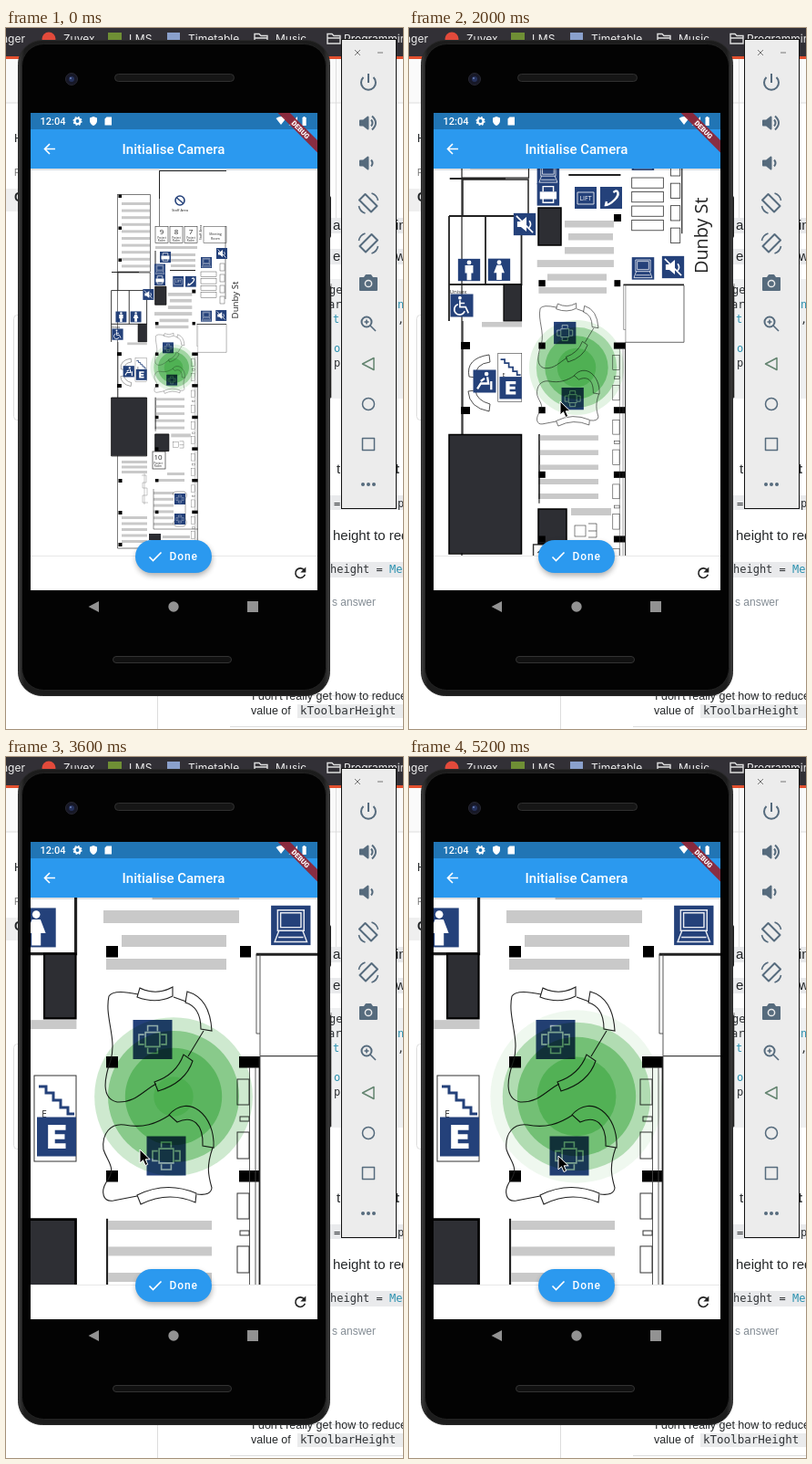
Write an HTML page that moves like this. It is 436 px wide and 768 px high and loops after 5.3 s.

```html
<!DOCTYPE html>
<html lang="en">
<head>
<meta charset="utf-8">
<title>Initialise Camera</title>
<style>
  html, body { margin: 0; width: 100%; height: 100%; overflow: hidden; background: #fff; }
  svg { display: block; }
  text { white-space: pre; }
  .ui { font-family: Inter, sans-serif; }
  .app { font-family: Roboto, sans-serif; font-weight: 500; fill: #fff; }
  .web { font-family: "Liberation Sans", Arial, sans-serif; fill: #242729; }
  .code { font-family: "DejaVu Sans Mono", monospace; font-size: 12px; fill: #303336; }
  .plan { font-family: "Open Sans", sans-serif; fill: #222; }
  .line { fill: none; stroke: #222; stroke-width: 1; }
  .tool { fill: none; stroke: #566b7d; stroke-width: 2; stroke-linejoin: round; }
  #pulse { mix-blend-mode: multiply; }
</style>
</head>
<body>
<svg width="436" height="768" viewBox="0 0 436 768">
  <defs>
    <clipPath id="view"><rect x="27" y="154" width="315" height="424.500"/></clipPath>
    <clipPath id="screen"><rect x="27" y="93" width="315" height="523"/></clipPath>
    <filter id="soft" x="-30%" y="-50%" width="160%" height="220%"><feGaussianBlur stdDeviation="3"/></filter>
    <linearGradient id="rim" x2="1" y2="0">
      <stop offset="0" stop-color="#3c3c3c"/><stop offset=".02" stop-color="#1c1c1c"/>
      <stop offset=".98" stop-color="#1c1c1c"/><stop offset="1" stop-color="#3c3c3c"/>
    </linearGradient>
  </defs>

  <!-- browser page -->
  <rect width="436" height="768" fill="#fff"/>
  <rect y="34" width="436" height="48" fill="#fafafa"/>
  <rect width="436" height="31" fill="#323036"/>
  <rect y="31" width="436" height="3" fill="#e2502f"/>
  <g class="ui" font-size="12" fill="#eee">
    <text x="-5" y="16">nger</text><text x="63" y="16">Zuvex</text>
    <text x="135" y="16">LMS</text><text x="200" y="16">Timetable</text>
    <text x="296" y="16">Music</text><text x="371" y="16">Programming</text>
  </g>
  <circle cx="47" cy="12" r="7.500" fill="#e24a3b"/>
  <rect x="112" y="5" width="15" height="14" fill="#6f8f35"/>
  <rect x="177" y="5" width="14" height="14" fill="#8aa0cc"/>
  <g fill="none" stroke="#ddd" stroke-width="1.400">
    <path id="folder" d="M273 17V6.500h5l2 2h7V17zM273 11h14"/>
    <use href="#folder" x="80"/>
  </g>
  <path d="M0 82h14M355 82h81M362.500 34v178M166.500 728v40M246 731.500h190M246 765.500h190" stroke="#dcdcdc"/>
  <rect x="8.500" y="314.500" width="30" height="115" rx="4" fill="#fff" stroke="#ddd"/>
  <rect y="176" width="14" height="25" fill="#efefef"/>
  <g class="web">
    <text x="9" y="125" font-size="13">Home</text>
    <text x="9" y="162" font-size="10" fill="#777">PUB</text>
    <text x="9" y="190" font-size="14" font-weight="700">C</text>
  </g>
  <g fill="#e9eaec">
    <rect x="355" y="208" width="81" height="17"/><rect x="355" y="242" width="81" height="17"/>
    <rect x="355" y="275" width="81" height="131" fill="#eff0f1"/>
    <rect x="355" y="512" width="81" height="16"/><rect x="355" y="585" width="81" height="17"/>
  </g>
  <rect x="354" y="280" width="4" height="125" fill="#b5b5b5"/>
  <g class="web" font-size="15">
    <text x="359" y="221">a</text><text x="428" y="221">in</text>
    <text x="359" y="255">e</text><text x="428" y="255">w</text>
    <text x="363" y="488">t</text><text x="427" y="488" font-weight="700">t</text>
    <text x="359" y="561">height to reduce</text>
    <text x="358" y="633" font-size="12" fill="#848d95">s answer</text>
    <text x="270" y="736" font-size="12.500">I don't really get how to reduce</text>
    <text x="269" y="752" font-size="12.500">value of</text>
  </g>
  <rect x="320" y="741" width="116" height="15" fill="#eaebec"/>
  <g class="code">
    <text x="355" y="291">ge</text><text x="354" y="307">ar</text><text x="430" y="307" fill="#2b91af">n</text>
    <text x="359" y="323" fill="#2b91af">t</text><text x="430" y="323">,</text>
    <text x="360" y="355" fill="#2b91af">o</text><text x="360" y="371">p</text>
    <text x="360" y="525">=</text><text x="430" y="525">p</text>
    <text x="356" y="597">height = <tspan fill="#2b91af">Me</tspan></text>
    <text x="323" y="752" font-size="12.500">kToolbarHeight</text>
  </g>

  <!-- phone -->
  <rect x="351" y="184" width="6" height="46" rx="2" fill="#222"/>
  <rect x="351" y="282" width="6" height="124" rx="2" fill="#222"/>
  <rect x="13.500" y="13.500" width="342" height="718" rx="26" fill="url(#rim)" stroke="#2a2a2a"/>
  <rect x="17.500" y="17.500" width="334" height="708" rx="24" fill="#030303" stroke="#242424"/>
  <rect x="119.500" y="50.500" width="131" height="8" rx="4" fill="#161616" stroke="#303030"/>
  <rect x="117.500" y="688.500" width="130" height="7" rx="3.500" fill="#111" stroke="#333"/>
  <circle cx="72" cy="56" r="6.500" fill="#171827" stroke="#272731"/>
  <circle cx="72" cy="56" r="3" fill="#26325c"/><circle cx="71" cy="55" r="1" fill="#6d80b8"/>
  <g fill="#929292">
    <path d="M102 628v12l-11.500-6z"/><circle cx="184" cy="634" r="5.700"/><rect x="265" y="628" width="12" height="12"/>
  </g>

  <!-- app -->
  <rect x="27" y="93" width="315" height="523" fill="#fff"/>
  <g clip-path="url(#view)">
    <g id="map"></g>
    <g id="pulse" fill="#4caf50"></g>
  </g>
  <path d="M27 578.500h315" stroke="#e8e8e8"/>
  <g clip-path="url(#screen)">
    <rect x="27" y="152" width="315" height="4" fill="#000" opacity=".12"/>
    <rect x="27" y="111" width="315" height="43" fill="#2b99ef"/>
    <rect x="27" y="93" width="315" height="18" fill="#2175b5"/>
    <text class="app" x="37.500" y="106" font-size="11">12:04</text>
    <g fill="#fff">
      <circle cx="78.500" cy="102" r="3" fill="none" stroke="#fff" stroke-width="2.200"/>
      <circle cx="78.500" cy="102" r="4.400" fill="none" stroke="#fff" stroke-width="1.300" stroke-dasharray="1.800 1.650"/>
      <path d="M96 97l4 1.600v3.400q-.5 3.700-4 5q-3.500-1.300-4-5v-3.400zM110.500 97.500h5.500v9h-7.500v-7zM296.500 99q5.500-4 11 0l-5.500 7zM320 97v9.500h-9.500zM325.500 98h1v-1h2v1h1.200v9h-4.200z"/>
    </g>
    <g transform="translate(342 93) rotate(45)">
      <rect x="-45" y="21.300" width="90" height="9.400" fill="#922434" opacity=".92"/>
      <text class="app" y="28.800" font-size="7.600" text-anchor="middle" style="font-weight:900">DEBUG</text>
    </g>
    <path d="M54 132.500H43M48 127l-5.500 5.500l5.500 5.500" fill="none" stroke="#fff" stroke-width="1.600"/>
    <text class="app" x="184" y="138" font-size="15" text-anchor="middle">Initialise Camera</text>
    <rect x="143" y="564" width="83" height="36" rx="18" opacity=".32" filter="url(#soft)"/>
    <rect x="142" y="561" width="84" height="36" rx="18" fill="#2b99ef"/>
    <path d="M157.500 579.500l4 4l9-9" fill="none" stroke="#fff" stroke-width="1.600"/>
    <text class="app" x="179.500" y="583.300" font-size="12" letter-spacing=".9">Done</text>
    <path d="M327.500 594a5.300 5.300 0 1 0 .8 4.700" fill="none" stroke="#222" stroke-width="1.600"/>
    <path d="M329.300 590.500v6h-6z" fill="#222"/>
  </g>

  <!-- emulator tools -->
  <rect x="368.500" y="12.500" width="60" height="514" fill="#ececec" stroke="#111"/>
  <path d="M383 24l6 6m0-6l-6 6M408 27h6" stroke="#777" fill="none"/>
  <g class="tool">
    <path d="M398 50v10M392.500 54a8 8 0 1 0 11 0"/>
    <g id="speaker"><path d="M389 101.500h3.500l5-4v13l-5-4H389z" fill="#566b7d"/><path d="M401 100.500q3 3.500 0 7"/></g>
    <path d="M402 96.500q8 7.500 0 15"/>
    <use href="#speaker" y="44"/>
    <g id="turn"><path d="M394.500 182l13 13l-6.500 6.500l-13-13z"/><path d="M387.500 195q1 6 7 8M408.500 189q-1-6-7-8" stroke-width="1.600"/></g>
    <use href="#turn" transform="translate(796 44) scale(-1 1)"/>
    <path d="M389 274h4.500l2-3h5l2 3h4.500v13h-18z" fill="#566b7d"/>
    <circle cx="398" cy="280" r="3.600" stroke="#ececec" stroke-width="1.500"/>
    <circle cx="396" cy="322" r="5.500"/><path d="M400 326l6 6M393.500 322h5M396 319.500v5" stroke-width="1.600"/>
    <path d="M404 361.500v13l-12.500-6.500z" stroke="#63846f" stroke-width="1.500"/>
    <circle cx="398" cy="412" r="6.500" stroke-width="1.500"/>
    <rect x="391.500" y="449.500" width="13" height="13" stroke-width="1.500"/>
  </g>
  <g fill="#566b7d"><circle cx="392" cy="500" r="2"/><circle cx="398" cy="500" r="2"/><circle cx="404" cy="500" r="2"/></g>

  <path id="cursor" d="M0 0v15l3.500-3.300l2.500 5.800l2.700-1.200l-2.500-5.500h5z" fill="#000" stroke="#fff" stroke-width="1"/>
</svg>

<script>
const CX = 184.5, CY = 366, LOOP = 5300, STEP = 100;
const NEAR = 3.61, MID = 2.04;
const $ = id => document.getElementById(id);

// Drawing helpers returning SVG markup
const box = (x, y, w, h, fill = '#000') => `<rect x="${x}" y="${y}" width="${w}" height="${h}" fill="${fill}"/>`;
const frame = (x, y, w, h, sw = 1, fill = 'none') =>
  `<rect x="${x}" y="${y}" width="${w}" height="${h}" fill="${fill}" stroke="#333" stroke-width="${sw}"/>`;
const path = (d, sw = 1, stroke = '#222') => `<path class="line" d="${d}" style="stroke:${stroke};stroke-width:${sw}"/>`;
const label = (x, y, size, str, more = '') =>
  `<text class="plan" x="${x}" y="${y}" font-size="${size}" text-anchor="middle" ${more}>${str}</text>`;
const repeat = (n, fn) => Array.from({ length: n }, (_, i) => fn(i)).join('');
const bars = (x, y, w, h, n, gap) => repeat(n, i => box(x, y + i * gap, w, h, '#c9c9c9'));
const zone = (k, body) => `<g transform="${zoomAt(1 / k)}">${body}</g>`;
const zoomAt = s => `translate(${CX} ${CY}) scale(${s}) translate(${-CX} ${-CY})`;

const ink = (d, sw = .7) => `<path d="${d}" fill="none" stroke="#fff" stroke-width="${sw}"/>`;
const solid = d => `<path d="${d}" fill="#fff"/>`;
const body = skirt => `<circle cy="-4" r="1.200" fill="#fff"/>` +
  solid(skirt ? 'M-1.300-2.500h2.600l1.600 4.200h-1.500v3.800h-2.800V1.700h-1.500z' : 'M-2.200-2.500h4.400v4.200h-1v3.800h-2.400V1.700h-1z');
const glyphs = {
  table: `<g opacity=".65">${ink('M-2.200-2.200h4.400v4.400h-4.400zM-1.500-2.600v-1.600h3v1.600M-1.500 2.600v1.600h3V2.600M-2.600-1.500h-1.600v3h1.600M2.600-1.500h1.600v3H2.600', .45)}</g>`,
  pc: `<g opacity=".9">${ink('M-4-4.600h8v6.200h-8zM-3.100-3.800h6.200V.6h-6.200zM-3.600 1.600l-1.300 3.400h9.800l-1.300-3.400M-3.800 3.600h7.600', .4)}</g>`,
  mute: solid('M-4-1.500h2l3-2.500v8l-3-2.500h-2z') + ink('M-4.500-4.500l9 9M2.500-1.800q1.500 2 0 3.600', .8),
  man: body(false), woman: body(true),
  wheel: `<circle cx="-1" cy="-4" r=".9" fill="#fff"/>` + ink('M-1-2.800V.8h3l1.500 3.200M-2-.6a2.800 2.800 0 1 0 3.500 3.600M-1-1.200h2.500', .8),
  sit: `<circle cx="1" cy="-3.800" r="1.100" fill="#fff"/>` + ink('M1.500-2.200L2 1.200h-4L-3.800 4M0-1.500l-2 1.500M3.500 0v4.500', 1.100),
  lift: ink('M-4.500-3h9v6.500h-9z', .4) + `<text y="1.500" font-size="3.500" class="plan" style="fill:#fff" text-anchor="middle">LIFT</text>`,
  phone: ink('M3-4q2 2-1 5t-5 3l.5-2M3-4l-1.800 1', 1.200),
  print: solid('M-4.500-1.500h9v4h-9z') + ink('M-2.800-1.500v-2.800h5.600v2.800M-2.800 1.500v2.800h5.600V1.500'),
  exit: `<path d="M-2.600-3.600h5.400v1.600h-3.300v1.200h3v1.600h-3V2h3.300v1.600h-5.400z" fill="#fff"/>`
};
const icon = (x, y, name, size = 12) =>
  `<g transform="translate(${x} ${y}) scale(${size / 12})">${box(-6, -6, 12, 12, '#24417a')}${glyphs[name]}</g>`;

// Whole floor, at the widest zoom
const outer = [
  path('M242 156.500H168.500V217M122.500 182.500H158.500V267H122.500M122.500 182V570H211M241 217V297', .6),
  path('M168.500 156.500H242M168.500 156.500V187M116 267.500H146', 1),
  bars(127, 191, 31, 3, 10, 7.6),
  repeat(3, i => box(123.500, 182.500 + 35 * i, 3.500, 3.500)),
  `<circle cx="191" cy="189" r="5" fill="none" stroke="#24417a" stroke-width="1.600"/>`, path('M187.500 186l7 6', 1.400, '#24417a'),
  label(191, 200.500, 4, 'Staff Area'),
  [9, 8, 7].map((n, i) => frame(164 + 16 * i, 217.500, 14, 18, .6) + label(171 + 16 * i, 226, 8, n) +
    label(171 + 16 * i, 230.500, 3, 'Project') + label(171 + 16 * i, 234, 3, 'Room')).join(''),
  frame(217, 217.500, 25, 18, .5), label(230, 227, 3.600, 'Meeting'), label(230, 232, 3.600, 'Room'),
  label(0, 0, 3.600, 'Staff Area', 'transform="translate(215 224) rotate(-90)"'),
  bars(164, 239, 46, 3, 1, 0), bars(181, 247, 27, 3, 3, 6), path('M164 244V270M180 265.500H208', 1),
  icon(175, 251, 'print'), icon(237, 247, 'mute'), icon(220, 257, 'pc'),
  icon(169, 264.500, 'pc'), icon(169, 276, 'print'),
  repeat(4, i => frame(214, 267 + 7.6 * i, 17, 5.500, .4) + frame(235, 258 + 12 * i, 5, 8, .4)),
  label(0, 0, 9.700, 'Dunby St', 'transform="translate(255 298) rotate(-90)"'),
  bars(127, 474, 28, 3, 3, 5.5),
  repeat(3, i => box(123.500, 494 + 35 * i, 4, 4)),
  path('M149 490h5v8h-4v6h5v8h-5v8h6M152 488v34', .4, '#777'), bars(127, 535, 28, 3, 5, 6.5),
  frame(161, 464, 14, 19, .7), label(167, 473, 8, '10'), label(167, 477.500, 3, 'Project'), label(167, 481, 3, 'Room'),
  bars(177, 487, 19, 3, 1, 0), bars(165, 494, 31, 3, 1, 0),
  bars(162, 508, 22, 3, 6, 6.8), path('M162 505V549H211', .5),
  icon(191, 516, 'table'), icon(191, 538, 'table'),
  path('M184 512q-2-4 4-4h8q4 2 1 8v22q3 6-2 8h-8q-5-2-2-6', .4),
  box(157, 554, 13, 7, '#2d2e33'), bars(172, 556, 30, 3, 2, 6)
].join('');

// Rooms around the middle
const middle = [
  path('M59 166H131V206M59 166V206', 1.500), path('M44 206H123.500V281H44M44 206V321M84 206V281', 1.800),
  path('M59 321V445', 1.200), box(104, 281, 19.500, 40, '#2d2e33'), path('M104 281H123.500V321H104Z', 1.200, '#000'),
  bars(80, 322, 44, 5.600, 1, 0), label(54, 291, 6, 'Unisex'),
  icon(127, 215, 'mute', 24.3), icon(66, 265, 'man', 24.3), icon(99, 264.8, 'woman', 24.3), icon(58, 304, 'wheel', 25),
  icon(194, 186, 'lift', 24), icon(222, 186, 'phone', 24),
  box(142, 197, 25, 41, '#2d2e33'), path('M142 197H167V238H142Z', 1.500, '#000'),
  bars(171, 211, 54, 7.500, 1, 0), bars(175, 225, 49, 7.500, 1, 0), bars(171, 240, 54, 7.500, 1, 0),
  icon(257, 263.4, 'pc', 24.5), icon(290, 262, 'mute', 24.3),
  box(225, 204, 8, 8),
  box(57, 344, 10, 8), box(57, 415, 10, 8),
  path('M235.500 281.400H302', 1.700), path('M302 282V344.300H238', .8, '#444'),
  path('M88 358Q62 362 66 382L73 383Q72 368 89 366ZM65 398Q66 416 88 420L89 412Q74 408 73 397Z', .8),
  icon(83, 387, 'sit', 25),
  box(44, 445.5, 79.5, 130, '#2e2f34'), path('M44 445.500H123.500V576H44Z', 1.500, '#000'),
  bars(142, 494, 66, 6, 2, 16), path('M143 445V516', 1.200),
  box(142, 527, 31, 38, '#2d2e33'), path('M142 527H173V565H142Z', 1.500, '#000'),
  bars(178, 526, 44, 8, 1, 0), frame(182, 545, 12, 12, .6), path('M197 543h9v15h-9m0-7h9', .6)
].join('');

// Lounge under the marker
const lounge = [
  bars(107, 168, 149, 14, 1, 0), bars(127, 195, 115, 13, 1, 0), bars(110, 221, 132, 12, 1, 0),
  bars(112, 508, 114, 10, 3, 28.5), path('M111 506V640', 2),
  repeat(7, i => box(110, 328 + 125 * i, 13, 12.500) + box(256, 328 + 125 * i, 23, 12.500)),
  box(110, 207, 13, 12.5), box(257, 207, 12, 12.5),
  path('M275 216V303H279V216M279 303V328M267.500 340V1100M274 340V1100', .9, '#444'),
  path('M278.500 328V1100', 1.800),
  repeat(6, i => frame(254, 353 + 125 * i, 13, 28) + frame(257, 394 + 125 * i, 10, 5) + frame(254, 411 + 125 * i, 13, 29)),
  frame(31, 349, 46, 94, 1, '#fff'), path('M36 361h8v7h8v8h8v8h8v7h7', 3, '#24417a'), label(42, 395, 10, 'E'),
  icon(55.500, 416, 'exit', 43),
  path('M113 262C108 285 122 308 115 332C108 352 104 374 122 378C142 379 150 366 165 358M113 262Q118 254 145 260M184 263L198 268M217 300L200 328', 1.100),
  path('M147 253Q165 262 183 252V262Q165 271 144 263ZM199 257Q224 264 226 300L214 298Q214 274 197 269ZM195 326Q187 348 163 356L167 366Q197 357 205 333Z', 1.100),
  path('M107 430C105 412 115 401 130 403C150 407 165 402 180 392M107 430C112 445 122 450 110 466C104 476 106 488 118 486L144 481M227 428C220 448 222 458 226 472Q225 481 210 479', 1.100),
  path('M179 392C200 368 230 392 228 428L216 426C217 402 205 392 188 400ZM144 480Q176 464 209 478L208 488Q178 475 148 490Z', 1.100),
  icon(161, 309.500, 'table', 43), icon(176, 437, 'table', 43)
].join('');

$('map').innerHTML = outer + zone(MID, middle) + zone(NEAR, lounge);
$('pulse').innerHTML = repeat(4, () => '<circle cx="184" cy="372"/>');
const rings = [...$('pulse').children];

// Rows: time, then values
const zoom = [[0, 1], [1300, 1], [1500, 1.38], [1800, 1.92], [2000, 2.04], [2400, 2.7], [2700, 3.2], [3000, 3.507], [3200, NEAR]];
const pointer = [[300, 436, 740], [700, 215, 500], [1000, 166, 416], [1200, 166, 416], [1400, 175, 396],
  [2000, 166, 409], [2600, 153, 424], [3000, 147, 430], [4900, 147, 430], [5200, 164, 437]];

function sample(rows, t) {
  const i = rows.findIndex(r => r[0] >= t);
  if (i < 0) return rows[rows.length - 1].slice(1);
  if (!i) return rows[0].slice(1);
  const a = rows[i - 1], b = rows[i], p = (t - a[0]) / (b[0] - a[0]);
  return a.slice(1).map((v, j) => v + (b[j + 1] - v) * p);
}

function draw(now) {
  const t = Math.floor(now % LOOP / STEP) * STEP;
  const [scale] = sample(zoom, t);
  $('map').setAttribute('transform', zoomAt(scale));
  const phase = (t + 600) % 1000 / 1000;
  rings.forEach((ring, i) => {
    const wave = (3 - i + phase) / 4;
    ring.setAttribute('r', 26.9 * scale * Math.sqrt(wave));
    ring.setAttribute('opacity', (1 - wave) ** .8);
  });
  const [x, y] = sample(pointer, t);
  $('cursor').setAttribute('transform', `translate(${x} ${y})`);
  $('cursor').setAttribute('visibility', t < 300 ? 'hidden' : 'visible');
}

const start = performance.now();
function tick() {
  draw(performance.now() - start);
  requestAnimationFrame(tick);
}
tick();
</script>
</body>
</html>
```
